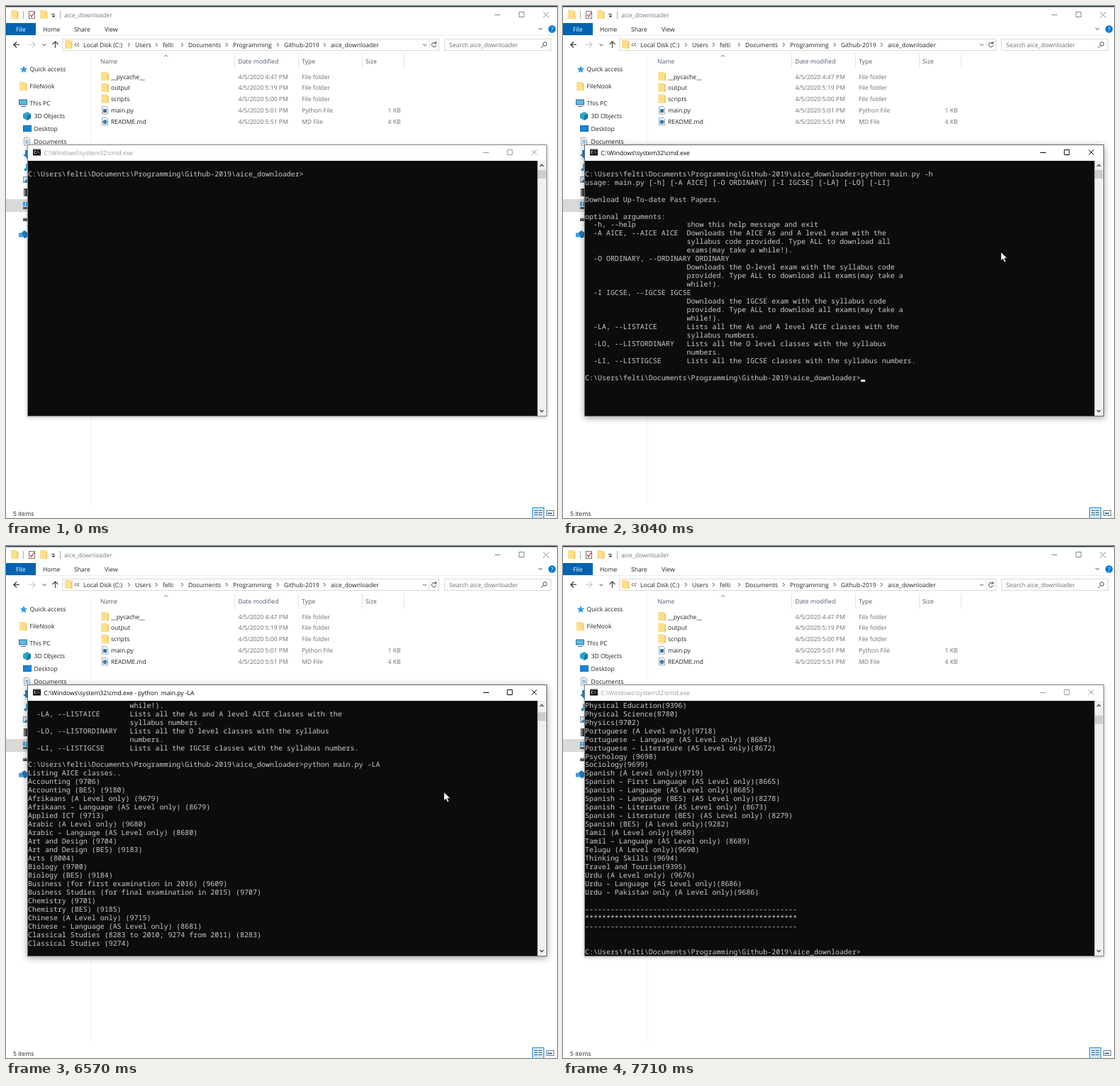
Write an HTML page that moves like this. It is 777x721 px and loops after 8190 ms.

```html
<!DOCTYPE html>
<html lang="en">
<head>
<meta charset="utf-8">
<title>Downloader demo</title>
<style>
  html, body { margin: 0; width: 100%; height: 100%; overflow: hidden; background: #fff; }
  svg { display: block; }
  text { font: 8.6px "Open Sans", "Noto Sans", sans-serif; text-rendering: geometricPrecision; white-space: pre; }
  .line { fill: none; stroke: #444; stroke-width: 1; }
  #rows text { font: 9.975px "Noto Sans Mono", "DejaVu Sans Mono", monospace; fill: #ccc; }
  #frame { fill: #fff; stroke: #888; filter: drop-shadow(0 1.5px 2.500px rgba(0,0,0,.28)); }
  #caption { fill: #999; }
  #controls { fill: none; stroke: #999; }
  .active #frame { stroke: #666; filter: drop-shadow(0 2px 5px rgba(0,0,0,.38)); }
  .active #caption { fill: #000; }
  .active #controls { stroke: #000; }
</style>
</head>
<body>
<svg width="777" height="721" viewBox="0 0 777 721">
  <defs>
    <g id="folder">
      <path d="M0 0h7l1 1.500h2.500v10.500h-10.500z" fill="#f0cb69"/>
      <path d="M0 .5h8.500v11.500h-8.500z" fill="#fddf8c"/>
    </g>
    <g id="page"><path d="M.5.5h6l2 2v8.500h-8z" fill="#fff" stroke="#9aa4ad"/></g>
    <path id="chevron" d="M0 0l2.500 2.500L0 5" class="line"/>
    <path id="down" d="M0 0l2.500 2.500L5 0" class="line"/>
  </defs>
  <rect width="777" height="721" fill="#fff"/>
  <g id="explorer"></g>
  <g id="console">
    <rect id="frame" x="30.500" y="195.500" width="732" height="382"/>
    <rect x="38" y="201.500" width="11" height="9" fill="#111"/>
    <path d="M38 202h11" stroke="#aaa"/>
    <path d="M42 204.500h-2v3h2M43.500 205v.8m0 1v.8M45 204.500l2 3" fill="none" stroke="#eee" stroke-width=".8"/>
    <text id="caption" x="53.500" y="209.600"></text>
    <path id="controls" d="M673 206.500h8M707 202.500h7v7h-7zM741.500 202.500l7 7m0-7l-7 7"/>
    <rect x="31" y="218" width="719" height="359" fill="#0c0c0c"/>
    <rect x="749.500" y="218" width="12.500" height="359" fill="#f0f0f0"/>
    <rect id="thumb" x="750" width="11.500" height="12" fill="#cdcdcd"/>
    <path d="M753 226l2.500-2.500 2.500 2.500M753 569l2.500 2.500 2.500-2.500" fill="none" stroke="#444" stroke-width="1.300"/>
    <g id="rows"></g>
    <rect id="caret" width="5.985" height="3" fill="#f2f2f2"/>
  </g>
  <path id="mouse" d="M0 0v12.300l2.900-2.700 2.100 4.600 2.200-1-2.100-4.500h4z" fill="#fff" stroke="#111" stroke-width=".8"/>
</svg>
<script>
const $ = id => document.getElementById(id);

// Explorer window
const label = (x, midY, text, fill = '#222', extra = '') =>
  `<text x="${x}" y="${midY + 3.2}" fill="${fill}" ${extra}>${text}</text>`;
const box = (x, y, w, h, fill, stroke = 'none') =>
  `<rect x="${x}" y="${y}" width="${w}" height="${h}" fill="${fill}" stroke="${stroke}"/>`;
const dot = (x, y, r, fill) => `<circle cx="${x}" cy="${y}" r="${r}" fill="${fill}"/>`;
const path = (d, stroke = '#444', fill = 'none', width = 1) =>
  `<path d="${d}" stroke="${stroke}" fill="${fill}" stroke-width="${width}"/>`;
const use = (id, x, y) => `<use href="#${id}" x="${x}" y="${y}"/>`;

const topBar = () => [
  box(0, 0, 777, 1.5, '#293943'),
  use('folder', 7, 6), use('folder', 48, 6),
  path('M24.500 7v11M76.500 7v11', '#aaa'),
  box(32.5, 7.5, 8, 10, '#fff', '#777'), path('M34 12l2 3 4-6', '#b5423a', 'none', 1.3),
  path('M64 11.500h5', '#333'), path('M64.500 13.500h5l-2.500 2.500z', 'none', '#222'),
  label(82, 12.5, 'aice_downloader', '#777'),
  path('M689 12.500h8M723.500 8.500h7v7h-7zM757.500 8.500l8 8m0-8l-8 8', '#888'),
  box(0, 24, 42, 17, '#0063b1'), label(14, 33, 'File', '#fff'),
  label(52, 33, 'Home'), label(96, 33, 'Share'), label(139, 33, 'View'),
  path('M0 41.500h777', '#ececec'),
  use('down', 751, 31), dot(770, 32.5, 5.2, '#0078d7'),
  label(770, 32.5, '?', '#fff', 'text-anchor="middle" font-weight="700"')
];

const addressBar = () => [
  path('M10 54.500h9m-4-4l-4 4 4 4', '#333', 'none', 1.2),
  path('M32 54.500h9m-4-4l4 4-4 4', '#ccc', 'none', 1.2),
  use('down', 51.5, 53.5),
  path('M69.500 59v-9m-4 4l4-4 4 4', '#444', 'none', 1.2),
  box(79.5, 46.5, 531, 16, '#fff', '#d9d9d9'),
  path('M597.500 47v15', '#e4e4e4'), use('folder', 83, 48),
  path('M99.500 52l-2.500 2.500 2.500 2.500m3.500-5l-2.500 2.500 2.500 2.500'),
  ...[[109, 'Local Disk (C:)'], [182, 'Users'], [221, 'felti'], [257, 'Documents'],
      [320, 'Programming'], [392, 'Github-2019'], [458, 'aice_downloader']]
    .map(([x, name], i) => label(x, 54.5, name) + (i ? use('chevron', x - 10, 52) : '')),
  use('down', 588, 53.5),
  path('M606 52.500a3.200 3.200 0 1 0 .8 2.500M606.500 50v3h-3', '#444'),
  box(618.5, 46.5, 150, 16, '#fff', '#d9d9d9'),
  label(625, 54.5, 'Search aice_downloader', '#6d6d6d'),
  '<circle cx="760" cy="53.500" r="2.700" class="line"/>', path('M758 55.500l-3.500 3.500')
];

const files = () => [
  label(133, 77.5, 'Name', '#4c5a6b'), label(327.5, 77.5, 'Date modified', '#4c5a6b'),
  label(417, 77.5, 'Type', '#4c5a6b'), label(507, 77.5, 'Size', '#4c5a6b'),
  path('M322.500 67v21M412.500 67v21M502.500 67v21M561.500 67v21', '#e3e3e3'),
  path('M223 71.500l2.500-2.500 2.500 2.500', '#666'),
  path('M119.500 66v637', '#f5f5f5'),
  ...[['__pycache__', '4:47', 'File folder'], ['output', '5:19', 'File folder'],
      ['scripts', '5:00', 'File folder'], ['main.py', '5:01', 'Python File', '1 KB'],
      ['README.md', '5:51', 'MD File', '4 KB']].map(([name, time, type, size], i) => {
    const y = 99.5 + i * 15.7;
    const mark = i === 3 ? box(137, y - 1.5, 5, 5, '#3572a5') : dot(139.5, y + 1, 3, '#3a7fb5');
    return (size ? use('page', 135, y - 5.5) + mark : use('folder', 134.5, y - 6.5)) +
      label(148, y, name) + label(327.5, y, `4/5/2020 ${time} PM`, '#6d6d6d') +
      label(417, y, type, '#6d6d6d') +
      label(556.5, y, size || '', '#6d6d6d', 'text-anchor="end"');
  })
];

const sidebar = () => [
  path('M25 84l1.500 3.400 3.700.4-2.800 2.500.8 3.700-3.200-1.900-3.200 1.900.8-3.700-2.800-2.500 3.700-.4z', 'none', '#2f9be6'),
  label(33.5, 89, 'Quick access'),
  use('folder', 19, 107), label(33.5, 113, 'FileNook'),
  box(18.5, 132, 11, 7, '#58b7ea', '#3c6f91'), path('M21 141.500h7', '#567'), label(33.5, 136.5, 'This PC'),
  path('M24 152l6-3 5 3v6l-5 3-6-3z', 'none', '#29a3cf'), path('M30 154l5-2v6l-5 3z', 'none', '#1176a3'),
  label(39.5, 155, '3D Objects'),
  box(24.5, 168.5, 11, 8, '#1686d9', '#126bb0'), label(39.5, 173, 'Desktop'),
  use('page', 25, 185), path('M27 189h5m-5 2h5m-5 2h5', '#4b8cc0'), label(39.5, 190.5, 'Documents'),
  path('M27 203h5v6h3l-5 6-6-6h3z', 'none', '#2286d0'),
  path('M29 222v8', '#1596dc', 'none', 1.5), dot(27.5, 230.5, 2, '#1596dc'),
  box(24.5, 240.5, 10, 8, '#cfe8f7', '#8497a3'), path('M25 248l4-4 4 4z', 'none', '#3b86b5'),
  box(25, 257, 10, 11, '#3c3f48'), path('M26.500 258v10', '#bbb'),
  box(0, 272, 31, 18, '#d9d9d9'),
  box(24, 283, 10, 3, '#555'), box(24, 276, 3, 2.5, '#1d9be0'), box(28, 276, 3, 2.5, '#1d9be0'),
  box(24, 279, 3, 2.5, '#1d9be0'), box(28, 279, 3, 2.5, '#1d9be0'),
  box(24, 299, 10, 4, '#555'), box(25, 298, 8, 1.5, '#bbb'),
  box(18, 319.5, 8, 6, '#3fa0e0'), path('M22 319l4-3 4 3v6l-4 2.500z', 'none', '#2178b8')
];

const statusBar = () => [
  label(10, 714.5, '5 items'),
  box(742.5, 706.5, 16, 16, '#cce8ff', '#2690d9'),
  path('M745 710.500h5m1 0h5m-11 3h5m1 0h5m-11 3h5m1 0h5', '#566'),
  box(762.5, 710.5, 10, 7, '#fff', '#777'), path('M764 714.500h6', '#286ea5', 'none', 2)
];
$('explorer').innerHTML = [topBar, addressBar, files, sidebar, statusBar].flatMap(part => part()).join('');

// Console content
const PROMPT = 'C:\\Users\\felti\\Documents\\Programming\\Github-2019\\aice_downloader>';
const HELP_CMD = 'python main.py -h', LIST_CMD = 'python main.py -LA';
const option = (flag, text) => ('  ' + flag).padEnd(24) + text;
const HELP = [
  'usage: main.py [-h] [-A AICE] [-O ORDINARY] [-I IGCSE] [-LA] [-LO] [-LI]', '',
  'Download Up-To-date Past Papers.', '',
  'optional arguments:',
  option('-h, --help', 'show this help message and exit'),
  option('-A AICE, --AICE AICE', 'Downloads the AICE As and A level exam with the'),
  option('', 'syllabus code provided. Type ALL to download all'),
  option('', 'exams(may take a while!).'),
  '  -O ORDINARY, --ORDINARY ORDINARY',
  option('', 'Downloads the O-level exam with the syllabus code'),
  option('', 'provided. Type ALL to download all exams(may take a'),
  option('', 'while!).'),
  '  -I IGCSE, --IGCSE IGCSE',
  option('', 'Downloads the IGCSE exam with the syllabus code'),
  option('', 'provided. Type ALL to download all exams(may take a'),
  option('', 'while!).'),
  option('-LA, --LISTAICE', 'Lists all the As and A level AICE classes with the'),
  option('', 'syllabus numbers.'),
  option('-LO, --LISTORDINARY', 'Lists all the O level classes with the syllabus'),
  option('', 'numbers.'),
  option('-LI, --LISTIGCSE', 'Lists all the IGCSE classes with the syllabus numbers.'), ''
];
const CLASSES = `Accounting (9706)
Accounting (BES) (9180)
Afrikaans (A Level only) (9679)
Afrikaans – Language (AS Level only) (8679)
Applied ICT (9713)
Arabic (A Level only) (9680)
Arabic – Language (AS Level only) (8680)
Art and Design (9704)
Art and Design (BES) (9183)
Arts (8004)
Biology (9700)
Biology (BES) (9184)
Business (for first examination in 2016) (9609)
Business Studies (for final examination in 2015) (9707)
Chemistry (9701)
Chemistry (BES) (9185)
Chinese (A Level only) (9715)
Chinese – Language (AS Level only) (8681)
Classical Studies (8283 to 2010; 9274 from 2011) (8283)
Classical Studies (9274)
Computer Science (9608)
Computing(9691)
Design and Technology (9705)
Design and Textiles (9631)
Divinity (9011 & 8041)
Economics (9708)
Economics (BES) (9275)
English – Language AS Level (until 2013) (8693)
English – Language (BES) (AS Level only) (8287)
English – Language AS and A Level (from 2014) (9093)
English – Literature (9695)
English – Literature (BES) (9276)
Environmental Management (AS only)(8291)
Food Studies (9336)
French (A Level only)(9716)
French – Language (AS Level only)(8682)
French – Language (BES) (AS Level only)(8276)
French – Literature (AS Level only)(8670)
French – Literature (BES) (AS Level only)(8277)
French (BES)(9281)
General Paper (8001)
General Paper (8004)
Geography (9696)
Geography (BES) (9278)
German (A Level only)(9717)
German – Language (AS Level only)(8683)
Global Perspectives (8987)
Hindi (A Level only)(9687)
Hindi – Language (AS Level only)(8687)
Hindi – Literature (AS Level only)(8675)
Hinduism (9014)
Hinduism (8058)
History (9389)
History (BES) (9279)
Islamic Studies (9013)
Islamic Studies (8053)
Japanese – Language (AS Level only)(8281)
Law (9084)
Marathi (A Level only)(9688)
Marathi – Language (AS Level only)(8688)
Marine Science (9693)
Mathematics (9709)
Mathematics (BES) (9280)
Mathematics – Further (9231)
Media Studies (9607)
Music (9703)
Music (AS Level only)(8663)
Nepal Studies (8024)
Physics (BES) (9286)
Pure Mathematics (8719)
Physical Education(9396)
Physical Science(8780)
Physics(9702)
Portuguese (A Level only)(9718)
Portuguese – Language (AS Level only) (8684)
Portuguese – Literature (AS Level only)(8672)
Psychology (9698)
Sociology(9699)
Spanish (A Level only)(9719)
Spanish – First Language (AS Level only)(8665)
Spanish – Language (AS Level only)(8685)
Spanish – Language (BES) (AS Level only)(8278)
Spanish – Literature (AS Level only) (8673)
Spanish – Literature (BES) (AS Level only) (8279)
Spanish (BES) (A Level only)(9282)
Tamil (A Level only)(9689)
Tamil – Language (AS Level only) (8689)
Telugu (A Level only)(9690)
Thinking Skills (9694)
Travel and Tourism(9395)
Urdu (A Level only) (9676)
Urdu – Language (AS Level only)(8686)
Urdu – Pakistan only (A Level only)(9686)`.split('\n');
const RULE = '-'.repeat(50);
const FOOTER = ['', RULE, '*'.repeat(50), RULE, '', '', PROMPT];

// Timelines: [start in ms, value]
const LOOP = 8190, LIST_START = 6540, LIST_END = 6780;
const helpTyped = [[0, 0], [1020, 1], [1080, 2], [1140, 3], [1200, 4], [1260, 5], [1290, 6],
  [1600, 7], [1790, 8], [1950, 14], [2160, 15], [2320, 16], [2420, 17]];
const listTyped = [[0, 0], [3280, 1], [3350, 2], [3430, 3], [3500, 4], [3580, 5], [3650, 6],
  [3820, 7], [3990, 8], [4120, 14], [4740, 15], [5290, 16], [5370, 17], [5530, 18]];
const caretToggles = [370, 900, 1020, 1570, 1600, 2640, 2970, 3740, 3820, 4720, 4740,
  5210, 5290, 5740, 5960, 6290, LIST_END, 7320];
const captions = [[0, ''], [2560, ' - python  main.py -h'], [3040, ''],
  [5990, ' - python  main.py -LA'], [LIST_END, '']];
const at = (steps, t) => steps.findLast(([start]) => start <= t)[1];

function bufferAt(t) {
  const lines = ['', PROMPT + HELP_CMD.slice(0, at(helpTyped, t))];
  if (t < 2520) return lines;
  if (t < 2970) return [...lines, ''];
  lines.push(...HELP, PROMPT + LIST_CMD.slice(0, at(listTyped, t)));
  if (t < 5960) return lines;
  if (t < 6390) return [...lines, ''];
  lines.push('Listing AICE classes..');
  if (t < LIST_START) return [...lines, ''];
  if (t >= LIST_END) return [...lines, ...CLASSES, ...FOOTER];
  const shown = 10 + 10 * Math.floor((t - LIST_START) / 30);
  return [...lines, ...CLASSES.slice(0, shown), ''];
}

const ROWS = 30, CELL_W = 5.985, CELL_H = 11.97, LEFT = 31, TOP = 218;
const rows = Array.from({ length: ROWS }, (_, i) => {
  const row = document.createElementNS('http://www.w3.org/2000/svg', 'text');
  row.setAttribute('x', LEFT);
  row.setAttribute('y', TOP + i * CELL_H + 9.7);
  return $('rows').appendChild(row);
});
const setText = (node, text) => { if (node.textContent !== text) node.textContent = text; };

function drawMouse(t) {
  const progress = (start, end) =>
    Math.min(1, Math.max(0, (Math.floor((t - start) / 27) * 27 + 27) / (end - start)));
  const away = t < 3000 ? (1 - progress(130, 560)) ** 2.5 : progress(6810, 7090) ** 2;
  $('mouse').style.display = t < 130 || t >= 7090 ? 'none' : '';
  $('mouse').setAttribute('transform', `translate(${617.5 + 160 * away} ${346.5 - 36 * away})`);
}

function draw(t) {
  const buffer = bufferAt(t);
  const scroll = Math.max(0, buffer.length - ROWS);
  const last = buffer.length - 1;
  rows.forEach((row, i) => setText(row, buffer[scroll + i] || ''));
  $('thumb').setAttribute('y', 231 + 0.77 * Math.sqrt(scroll));
  $('caret').setAttribute('x', LEFT + buffer[last].length * CELL_W);
  $('caret').setAttribute('y', TOP + (last - scroll + 1) * CELL_H - 3);
  $('caret').style.display = caretToggles.filter(time => time <= t).length % 2 ? '' : 'none';
  setText($('caption'), 'C:\\Windows\\system32\\cmd.exe' + at(captions, t));
  $('console').classList.toggle('active', t >= 370 && t < 7710);
  drawMouse(t);
}

const begin = performance.now();
function tick() {
  draw((performance.now() - begin) % LOOP);
  requestAnimationFrame(tick);
}
tick();
</script>
</body>
</html>
```
